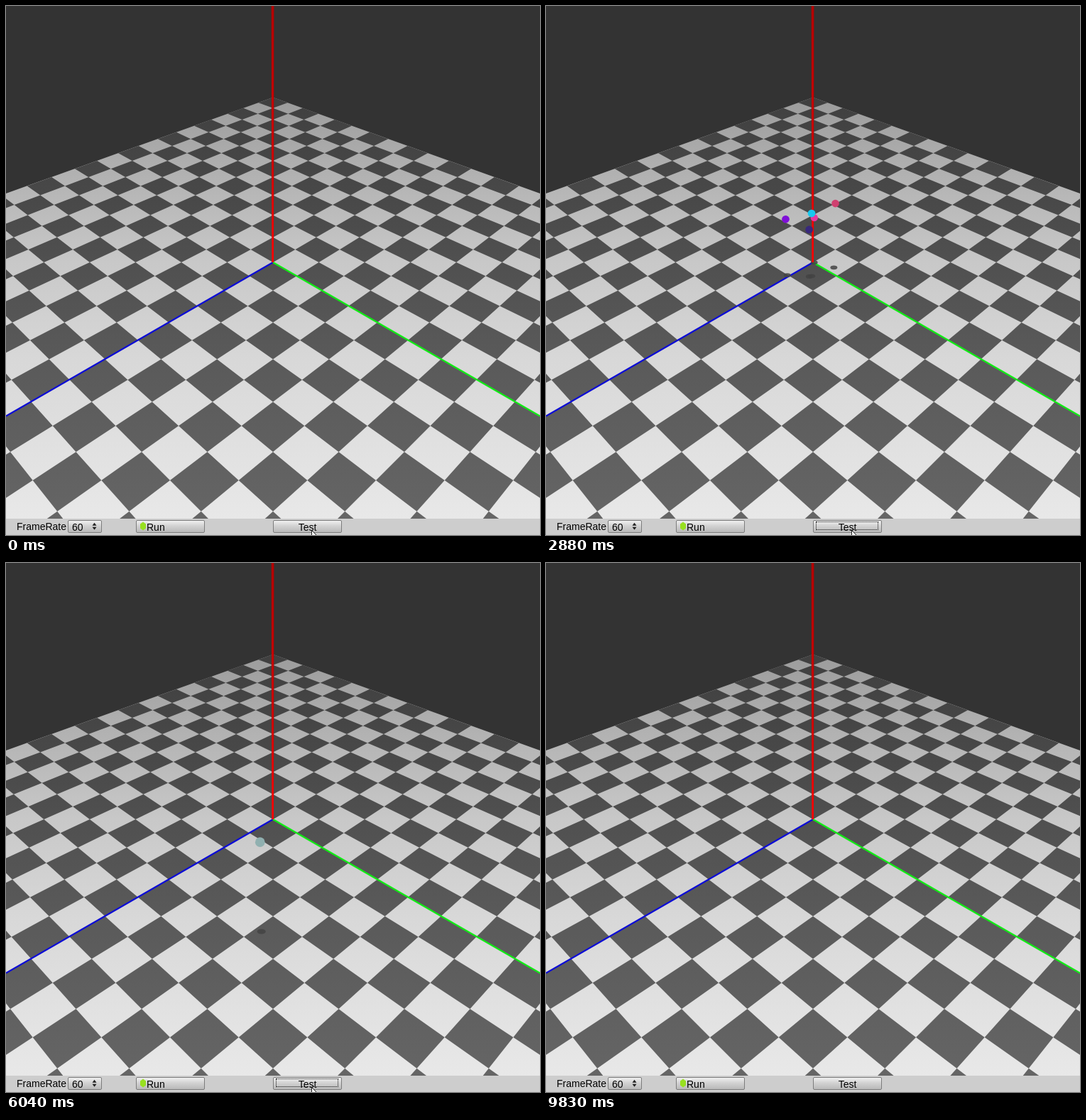
Recreate the animation shown at these times as an HTML page with a canvas. Size 752 by 745 pixels, loop 9920 ms.

```html
<!DOCTYPE html>
<html lang="en">
<head>
<meta charset="utf-8">
<title>Ball launcher</title>
<style>
  html, body { margin: 0; width: 752px; height: 745px; overflow: hidden; background: #333; }
  body { position: relative; }
  canvas { position: absolute; left: 0; top: 0; }
  .bar {
    position: absolute; left: 0; top: 722px; width: 752px; height: 23px; overflow: hidden;
    background: #cdcdcd; font: 14px/16px "Liberation Sans", Arial, sans-serif; color: #000;
  }
  .bar > * { position: absolute; box-sizing: border-box; }
  .label { left: 15px; top: 2.5px; }
  .btn {
    top: 2px; height: 18px; border: 1px solid #7c7c7c; border-radius: 2px;
    background: linear-gradient(#f0f0f0, #d2d2d2 45%, #b9b9b9);
  }
  .btn span { position: absolute; top: .5px; }
  .rate { left: 87px; width: 48px; }
  .run { left: 183px; width: 97px; }
  .test { left: 376px; width: 97px; text-align: center; animation: press 9.92s step-end infinite; }
  .test span { left: 0; right: 0; }
  .focus {
    left: 380px; top: 4px; width: 88px; height: 12px; border: 1px dotted #111;
    animation: focus 9.92s step-end infinite;
  }
  svg { left: 0; top: 0; }
  .cursor { animation: leave 9.92s step-end infinite; }
  @keyframes focus { 0% { opacity: 0 } 2.218% { opacity: 1 } 99.093% { opacity: 0 } }
  @keyframes press {
    0%, 3.2%, 27.2%, 42.3%, 63.4% { filter: none }
    2.218%, 26.109%, 41.23%, 62.298% { filter: brightness(.85) }
  }
  @keyframes leave {
    0% { transform: none }
    88.81% { transform: translateY(3px) }
    89.516% { transform: translateY(20px) }
  }
</style>
</head>
<body>
<canvas id="view" width="752" height="722"></canvas>
<div class="bar">
  <div class="label">FrameRate</div>
  <div class="btn rate"><span style="left:5px">60</span></div>
  <div class="btn run"><span style="left:14px">Run</span></div>
  <div class="btn test"><span>Test</span></div>
  <div class="focus"></div>
  <svg width="752" height="23">
    <path d="M121.5 9.8h6l-3-4zM121.5 11.8h6l-3 4z" fill="#222"/>
    <path d="M193 4.5l4 3v6l-4 3l-4-3v-6z" fill="#98e020"/>
    <path class="cursor" d="M430.5 16.5v14l3.2-3l2 5l2.5-1l-2-5h4.3z" fill="#fff" stroke="#222"/>
  </svg>
</div>
<script>
const W = 752, H = 722, CX = 376, CY = 361;
const FOCAL = 871.5, DIST = 19.1, SIN = Math.sqrt(1 / 3), COS = Math.sqrt(2 / 3);
const LOOP = 9920, HALF = 10, RADIUS = .107;
const view = document.getElementById('view').getContext('2d');

// a: across the screen, b: along the floor towards the camera, y: up
function project(a, b, y = 0) {
  const depth = DIST - b * COS - y * SIN;
  const scale = FOCAL / depth;
  return { x: CX + a * scale, y: CY - (y * COS - b * SIN) * scale, scale, depth };
}

const corner = (i, j) => project((i - j) / Math.SQRT2, (i + j) / Math.SQRT2);

function grayRamp(ctx, levels) {
  const g = ctx.createLinearGradient(0, 130, 0, H);
  [0, .228, .39, .625, 1].forEach((at, k) => {
    const v = levels[k];
    g.addColorStop(at, `rgb(${v},${v},${v})`);
  });
  return g;
}

function addQuad(ctx, i, j, size) {
  [[0, 0], [size, 0], [size, size], [0, size]].forEach(([u, v], k) => {
    const p = corner(i + u, j + v);
    k ? ctx.lineTo(p.x, p.y) : ctx.moveTo(p.x, p.y);
  });
  ctx.closePath();
}

function drawAxis(ctx, x, color) {
  ctx.strokeStyle = color;
  ctx.lineWidth = 2.2;
  ctx.beginPath();
  ctx.moveTo(CX, CY);
  ctx.lineTo(x, 577.5);
  ctx.stroke();
}

function drawFloor() {
  const layer = document.createElement('canvas');
  layer.width = W;
  layer.height = H;
  const ctx = layer.getContext('2d');
  ctx.fillStyle = '#333';
  ctx.fillRect(0, 0, W, H);

  ctx.fillStyle = grayRamp(ctx, [156, 183, 200, 216, 232]);
  ctx.beginPath();
  addQuad(ctx, -HALF, -HALF, 2 * HALF);
  ctx.fill();

  ctx.fillStyle = grayRamp(ctx, [64, 72, 80, 90, 101]);
  ctx.beginPath();
  for (let i = -HALF; i < HALF; i++)
    for (let j = -HALF; j < HALF; j++)
      if ((i + j) % 2 === 0) addQuad(ctx, i, j, 1);
  ctx.fill();

  drawAxis(ctx, 0, '#0c0cd6');
  drawAxis(ctx, W, '#10ec14');
  return layer;
}

const floor = drawFloor();
const red = view.createLinearGradient(0, 0, 0, CY);
red.addColorStop(0, '#b40000');
red.addColorStop(.6, '#cc0000');
red.addColorStop(1, '#ff0000');

function drawPole() {
  view.fillStyle = red;
  view.beginPath();
  view.moveTo(373.7, 0);
  view.lineTo(377.4, 0);
  view.lineTo(377, CY);
  view.lineTo(374.3, CY);
  view.fill();
}

// Ball: colour, flight seconds, start height, start a, b, landing a, b
const bursts = [
  { at: 200, balls: [
    ['#ff1e8c', 1.2, -.12, -.35, 1, -1.35, 2.45],
    ['#2a6bbf', 2.2, -.1, .04, -.1, 1.19, 1.54],
    ['#e8501e', 2.3, .17, -.49, -.34, .4, 1.6],
    ['#50b848', .62, .2, -.3, 0, -1.25, .6]
  ] },
  { at: 2570, balls: [
    ['#8010d8', 1.45, .69, -.32, -.04, -2.42, 3.25],
    ['#d04070', 1.75, .55, .57, .23, .94, .48],
    ['#18c8f0', 1.6, .71, 0, .4, -.2, 2],
    ['#38287c', 1.3, .56, -.05, .4, -.3, 1.8],
    ['#e838a0', 1.2, .68, .05, -.06, 0, .2]
  ] },
  { at: 4080, balls: [
    ['#90b0b0', 2.33, -.86, -.31, -1.01, -.28, 5.86],
    ['#d8d828', 1.94, -.56, .08, .46, -1.53, -1.9],
    ['#f038a0', 1, .13, -.1, 0, -.3, .3],
    ['#7880d8', .95, .38, .1, 0, .9, .9],
    ['#18c0b0', .9, .14, .1, 0, .47, .4]
  ] },
  { at: 6170, balls: [
    ['#4468e0', 2.3, .2, 0, -.3, -2.45, 4.2],
    ['#ff1840', 2.055, 0, 0, 0, -1.18, 1.84],
    ['#78a860', 2.12, .35, -.1, .2, -.94, 3.85],
    ['#c89030', .8, .2, .1, 0, .8, .6]
  ] }
];

function flyingBalls(time) {
  const list = [];
  for (const { at, balls } of bursts) {
    const s = (time - at) / 1000;
    for (const [color, flight, y0, a0, b0, a1, b1] of balls) {
      const k = s / flight;
      if (k < 0 || k > 1) continue;
      const y = (1 - k) * (y0 + 4 * flight * s);
      if (y < 0) continue;
      const a = a0 + (a1 - a0) * k, b = b0 + (b1 - b0) * k;
      list.push({ color, b, spot: project(a, b, y), shade: project(a, b) });
    }
  }
  return list.sort((p, q) => q.spot.depth - p.spot.depth);
}

function drawOval(p, color, flat = 1) {
  const r = RADIUS * p.scale;
  view.fillStyle = color;
  view.beginPath();
  view.ellipse(p.x, p.y, r, r * flat, 0, 0, 2 * Math.PI);
  view.fill();
}

const start = performance.now();

function frame() {
  const balls = flyingBalls((performance.now() - start) % LOOP);
  view.drawImage(floor, 0, 0);
  balls.forEach(({ shade }) => drawOval(shade, 'rgba(68,68,68,.86)', SIN));
  balls.filter(o => o.b < 0).forEach(o => drawOval(o.spot, o.color));
  drawPole();
  balls.filter(o => o.b >= 0).forEach(o => drawOval(o.spot, o.color));
  requestAnimationFrame(frame);
}

frame();
</script>
</body>
</html>
```
